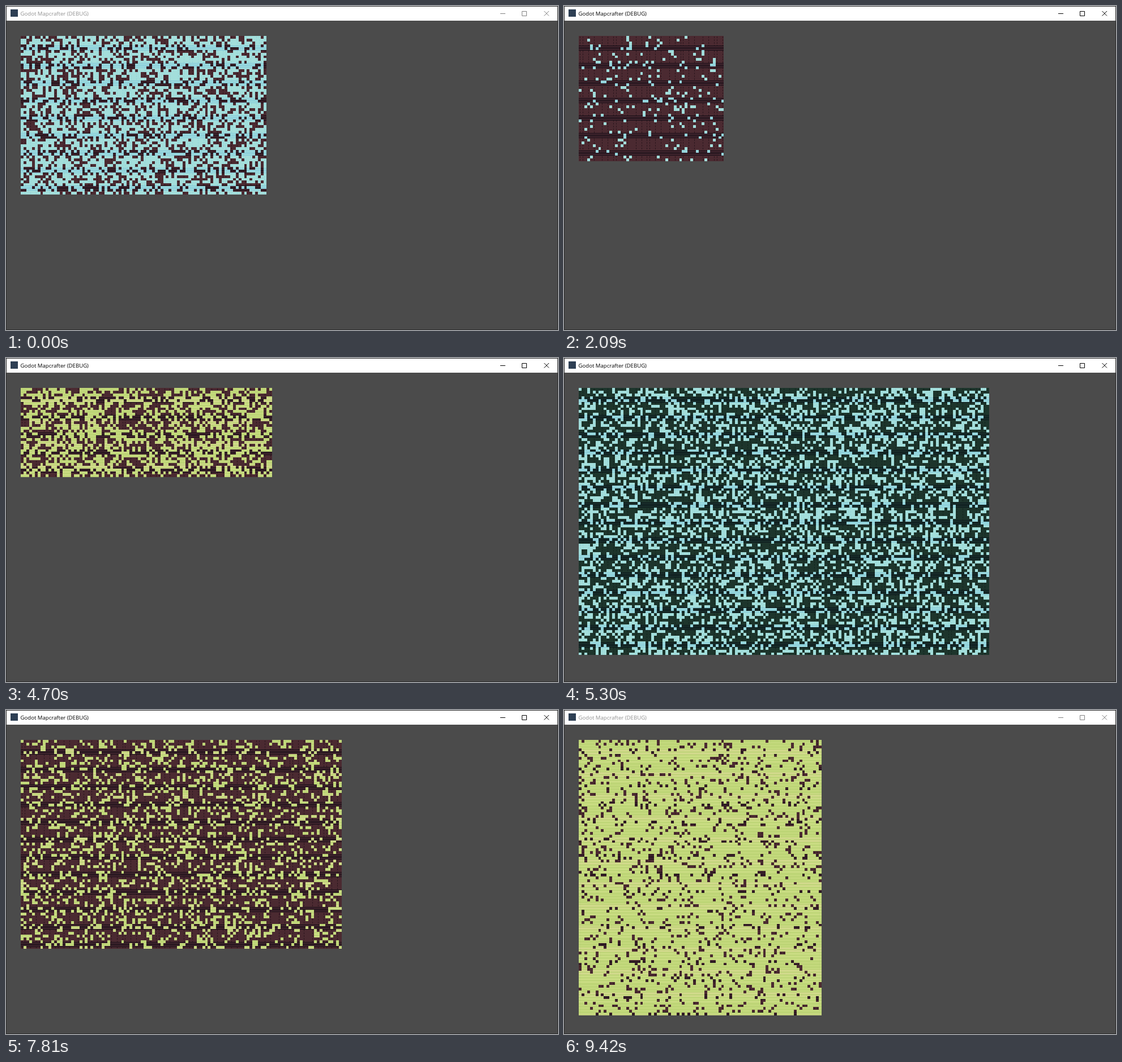
Recreate the animation shown at these times as an HTML page with a canvas. Size 975 px wide and 574 px high, loop 9520 ms.

```html
<!DOCTYPE html>
<html lang="en">
<head>
<meta charset="utf-8">
<title>Map generator</title>
<style>
  html, body { margin: 0; width: 100%; height: 100%; overflow: hidden; background: #4b4b4b; }
  canvas { display: block; }
</style>
</head>
<body>
<canvas id="stage" width="975" height="574"></canvas>
<script>
const ctx = document.getElementById('stage').getContext('2d');
const LOOP = 9520, CELL = 4.932, LEFT = 26, TOP = 53;
const px = col => Math.round(LEFT + col * CELL);
const py = row => Math.round(TOP + row * CELL);

const brown  = { base: '#4b2a31', band: '#452730', line: '#150d15', dash: '#2c171e' };
const forest = { base: '#1d352c', band: '#1a312c', line: '#0b161b', dash: '#13251f' };
const cyan   = { base: '#a3dedb', band: '#9fdcdd', line: '#82c8da', dash: '#93d5d9' };
const lime   = { base: '#c9dc82', band: '#d0d98a', line: '#b3cf6c', striped: true };

// start time, columns, rows, ground, top tile, share of top tiles
const maps = [
  [0, 88, 57, brown, cyan, .59],
  [390, 113, 79, brown, lime, .5],
  [890, 96, 60, forest, cyan, .5],
  [1490, 86, 71, brown, cyan, .5],
  [2090, 52, 45, brown, cyan, .095],
  [2890, 136, 93, brown, cyan, .5],
  [3400, 145, 68, brown, lime, .89],
  [4000, 126, 42, brown, cyan, .5],
  [4700, 90, 32, brown, lime, .5],
  [5300, 147, 96, forest, cyan, .37],
  [5900, 110, 94, brown, lime, .5],
  [6500, 138, 75, brown, cyan, .81],
  [7210, 80, 55, forest, cyan, .5],
  [7810, 115, 75, brown, lime, .27],
  [8320, 60, 78, brown, cyan, .5],
  [9020, 87, 99, brown, lime, .84]
];

function randomFrom(seed) {
  return () => {
    seed = (seed + 0x6D2B79F5) | 0;
    let n = Math.imul(seed ^ (seed >>> 15), 1 | seed);
    n = (n + Math.imul(n ^ (n >>> 7), 61 | n)) ^ n;
    return ((n ^ (n >>> 14)) >>> 0) / 4294967296;
  };
}

function box(color, x, y, w, h) {
  ctx.fillStyle = color;
  ctx.fillRect(x, y, w, h);
}

// Tile texture: scan-line bands, with broken upright lines between them
function paintTiles(tone, cols, rows) {
  const right = px(cols), bottom = py(rows), width = right - LEFT;
  box(tone.base, LEFT, TOP, width, bottom - TOP);
  if (!tone.striped) {
    for (let col = 0; col < cols; col++) {
      if (col * 5 % 12 > 5) continue;
      for (let row = 0; row < rows; row++) box(tone.dash, px(col) + 2, py(row) + 1, 1, 3);
    }
  }
  const period = tone.striped ? 39 : 31;
  for (let y = TOP + 17; y < bottom; y += period) box(tone.band, LEFT, y, width, Math.min(9, bottom - y));
  for (let y = TOP; y < bottom; y++) {
    const offset = y - TOP;
    const lined = tone.striped
      ? offset % 5 === 1 || offset % 5 === 3 && offset % 39 < 17
      : [17, 20, 22, 25].includes(offset % 31);
    if (lined) box(tone.line, LEFT, y, width, 1);
  }
}

function drawMap(index) {
  const [, cols, rows, ground, top, share] = maps[index];
  const random = randomFrom(index * 977 + 5);
  paintTiles(ground, cols, rows);
  ctx.save();
  ctx.beginPath();
  for (let row = 0; row < rows; row++) {
    for (let col = 0; col < cols; col++) {
      if (random() < share) {
        ctx.rect(px(col), py(row), px(col + 1) - px(col), py(row + 1) - py(row));
      }
    }
  }
  ctx.clip();
  paintTiles(top, cols, rows);
  ctx.restore();
}

function drawWindow(active) {
  box('#2b2b2b', 0, 0, 975, 574);
  box('#4b4b4b', 1, 26, 973, 547);
  box('#ffffff', 1, 1, 973, 25);
  box('#2e3f54', 8, 6, 13, 13);
  ctx.fillStyle = active ? '#000' : '#909090';
  ctx.font = '9.6px "Open Sans", "Noto Sans", sans-serif';
  ctx.fillText('Godot Mapcrafter (DEBUG)', 25.5, 17);
  ctx.strokeStyle = active ? '#000' : '#808080';
  ctx.lineWidth = 1;
  ctx.beginPath();
  ctx.moveTo(873, 13.5);
  ctx.lineTo(882, 13.5);
  ctx.rect(911.5, 9.5, 8, 8);
  ctx.moveTo(950.5, 9);
  ctx.lineTo(959, 17.5);
  ctx.moveTo(959, 9);
  ctx.lineTo(950.5, 17.5);
  ctx.stroke();
}

let shown = '';
function frame() {
  const time = performance.now() % LOOP;
  const index = maps.findLastIndex(map => map[0] <= time);
  const active = time >= 100 && time < 9420;
  const state = index + '/' + active;
  if (state !== shown) {
    shown = state;
    drawWindow(active);
    drawMap(index);
  }
  requestAnimationFrame(frame);
}
frame();
</script>
</body>
</html>
```
